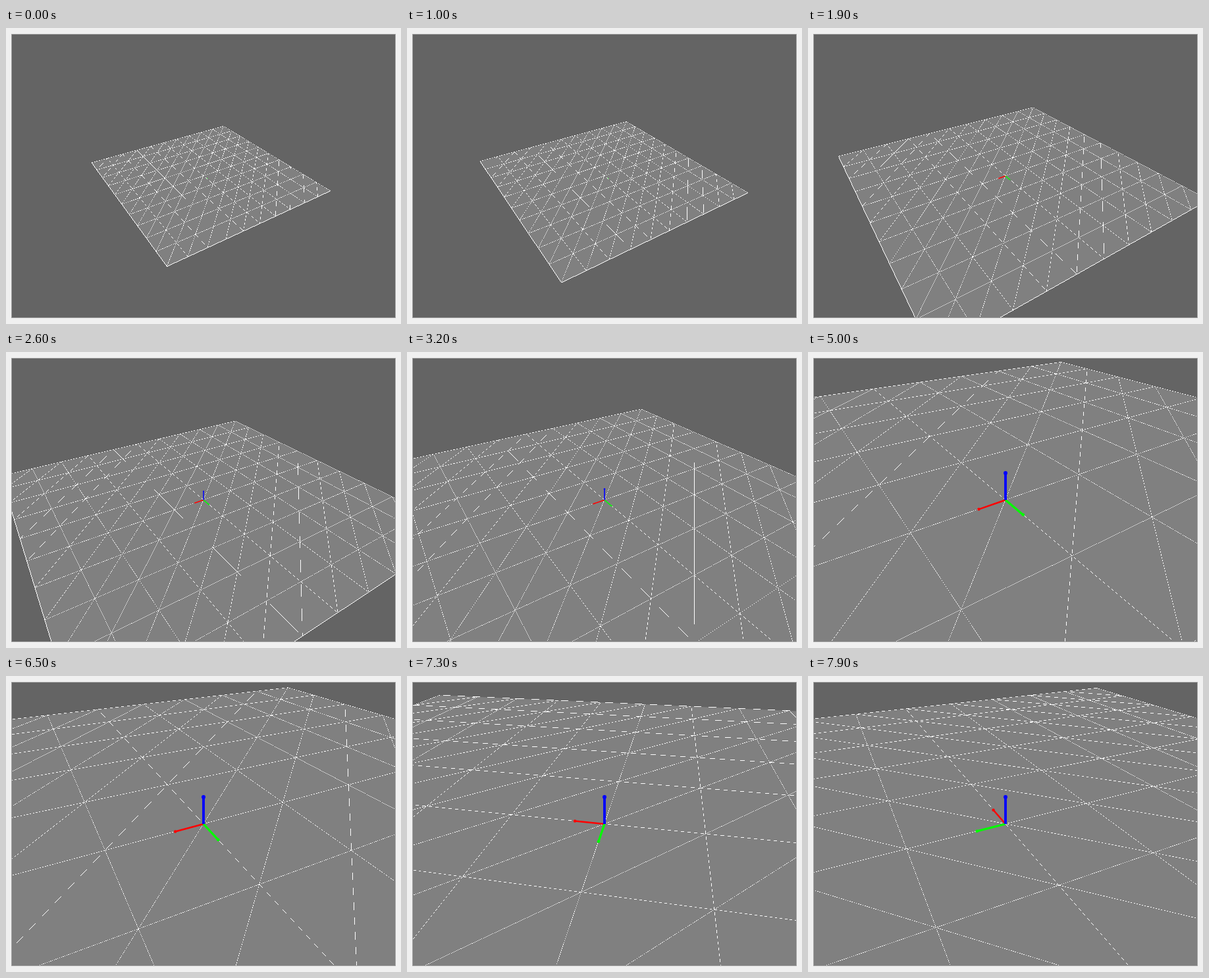
An HTML page with a canvas that plays this animation: 600 by 450 pixels, repeating every 8 s.

```html
<!DOCTYPE html>
<html lang="en">
<head>
<meta charset="utf-8">
<title>Orbit camera over a grid</title>
<style>
  html, body { margin: 0; width: 100%; height: 100%; overflow: hidden; background: #f0f0f0; }
  canvas { display: block; }
</style>
</head>
<body>
<canvas id="stage" width="600" height="450"></canvas>
<script>
const ctx = document.getElementById('stage').getContext('2d');
const LOOP = 8000, STEP = 100;
const VIEW = { x: 8, y: 9, w: 584, h: 432 };
const CX = VIEW.x + VIEW.w / 2, CY = VIEW.y + VIEW.h / 2;
const RAD = Math.PI / 180;
const FOCAL = 522.7;
const TILT = 32.7 * RAD, SIN = Math.sin(TILT), COS = Math.cos(TILT);
const HALF = 5, NEAR = 0.2, AXIS = 0.31;

// [time, value] keys; equal neighbours are pauses of the mouse
const ZOOM = [
  [400, 20], [700, 18.87], [800, 18.87], [1000, 17.85], [1400, 17.85],
  [1700, 13.35], [1800, 13.35], [1900, 12.97], [2600, 10.47], [2700, 9.9],
  [3500, 7.4], [3600, 7.4], [3800, 6.5], [4500, 4.48], [4600, 4.48],
  [4700, 3.97], [4800, 3.97], [5000, 3.5]
];
const TURN = [
  [6200, 32.7], [6300, 29.5], [6400, 29.5], [6500, 26.5], [6800, 26.5],
  [7000, 15.5], [7300, -10.4], [7900, -64.9]
];

function sample(keys, t) {
  if (t <= keys[0][0]) return keys[0][1];
  for (let i = 1; i < keys.length; i++) {
    const [t0, a] = keys[i - 1], [t1, b] = keys[i];
    if (t <= t1) return a + (b - a) * (t - t0) / (t1 - t0);
  }
  return keys[keys.length - 1][1];
}

function camera(dist, angle) {
  const c = Math.cos(angle), s = Math.sin(angle);
  return {
    dist,
    // world to eye space: right, up, depth
    eye(x, y, z = 0) {
      const u = -c * x + s * y, v = -s * x - c * y;
      return [u, v * SIN + z * COS, dist + v * COS - z * SIN];
    }
  };
}

const project = ([u, h, d]) => [CX + FOCAL * u / d, CY - FOCAL * h / d];

function clipNear(points, closed) {
  const out = [];
  points.forEach((p, i) => {
    if (p[2] >= NEAR) out.push(p);
    if (!closed && i === points.length - 1) return;
    const q = points[(i + 1) % points.length];
    if ((p[2] < NEAR) !== (q[2] < NEAR)) {
      const k = (NEAR - p[2]) / (q[2] - p[2]);
      out.push(p.map((a, j) => a + (q[j] - a) * k));
    }
  });
  return out;
}

// One-pixel line that fights with the plane: only pixels on its upper side win
function rasterLine(cam, x0, y0, x1, y1, edge) {
  const ends = clipNear([cam.eye(x0, y0), cam.eye(x1, y1)], false);
  if (ends.length < 2) return;
  const [a, b] = ends.map(project);
  const dx = b[0] - a[0], dy = b[1] - a[1];
  const solid = edge && a[1] + (CX - a[0]) * dy / (dx || 1e-6) > CY;
  const flat = Math.abs(dx) >= Math.abs(dy);
  const m = flat ? 0 : 1, n = 1 - m;
  const slope = flat ? dy / dx : dx / dy;
  const min = flat ? VIEW.x : VIEW.y, max = min + (flat ? VIEW.w : VIEW.h);
  const from = Math.max(min, Math.round(Math.min(a[m], b[m])));
  const to = Math.min(max, Math.round(Math.max(a[m], b[m])));
  const lowerHalf = flat || slope < 0;
  for (let i = from; i < to; i++) {
    const pos = a[n] + (i + 0.5 - a[m]) * slope;
    const cell = Math.floor(pos);
    if (solid || (pos - cell > 0.5) === lowerHalf) {
      if (flat) ctx.fillRect(i, cell, 1, 1);
      else ctx.fillRect(cell, i, 1, 1);
    }
  }
}

function drawPlane(cam) {
  const corners = [[-1, -1], [1, -1], [1, 1], [-1, 1]]
    .map(([x, y]) => cam.eye(x * HALF, y * HALF));
  ctx.fillStyle = '#808080';
  ctx.beginPath();
  clipNear(corners, true).map(project).forEach(p => ctx.lineTo(...p));
  ctx.fill();

  ctx.fillStyle = '#fff';
  for (let i = -HALF; i <= HALF; i++) {
    const edge = Math.abs(i) === HALF;
    rasterLine(cam, i, -HALF, i, HALF, edge);
    rasterLine(cam, -HALF, i, HALF, i, edge);
  }
  for (let k = 1 - 2 * HALF; k < 2 * HALF; k++) {
    const lo = Math.max(-HALF, -HALF - k), hi = Math.min(HALF, HALF - k);
    rasterLine(cam, lo, lo + k, hi, hi + k, false);
  }
}

function drawAxis(cam, dir, color, width, ball) {
  const scale = FOCAL / cam.dist;
  const tip = project(cam.eye(...dir.map(a => a * AXIS)));
  ctx.strokeStyle = ctx.fillStyle = color;
  ctx.lineWidth = Math.max(1.5, width * scale);
  ctx.beginPath();
  ctx.moveTo(CX, CY);
  ctx.lineTo(...tip);
  ctx.stroke();
  ctx.beginPath();
  ctx.arc(tip[0], tip[1], ball * scale, 0, 2 * Math.PI);
  ctx.fill();
}

function drawAxes(cam) {
  if (cam.dist > 16) {
    ctx.fillStyle = '#0f0';
    ctx.fillRect(305, 228, 1, 1);
    return;
  }
  drawAxis(cam, [1, 0, 0], '#f00', 0.017, 0.015);
  drawAxis(cam, [0, 1, 0], '#0f0', 0.022, 0.016);
  if (cam.dist < 12) drawAxis(cam, [0, 0, 1], '#00f', 0.026, 0.02);
}

function render(t) {
  const cam = camera(sample(ZOOM, t), sample(TURN, t) * RAD);
  ctx.fillStyle = '#f0f0f0';
  ctx.fillRect(0, 0, 600, 450);
  ctx.save();
  ctx.beginPath();
  ctx.rect(VIEW.x, VIEW.y, VIEW.w, VIEW.h);
  ctx.clip();
  ctx.fillStyle = '#646464';
  ctx.fillRect(VIEW.x, VIEW.y, VIEW.w, VIEW.h);
  drawPlane(cam);
  drawAxes(cam);
  ctx.restore();
  ctx.strokeStyle = '#a0a0a0';
  ctx.lineWidth = 1;
  ctx.strokeRect(VIEW.x + 0.5, VIEW.y + 0.5, VIEW.w - 1, VIEW.h - 1);
}

const start = performance.now();
let shown = -1;
function tick() {
  const t = Math.floor((performance.now() - start) % LOOP / STEP) * STEP;
  if (t !== shown) render(shown = t);
  requestAnimationFrame(tick);
}
tick();
</script>
</body>
</html>
```
